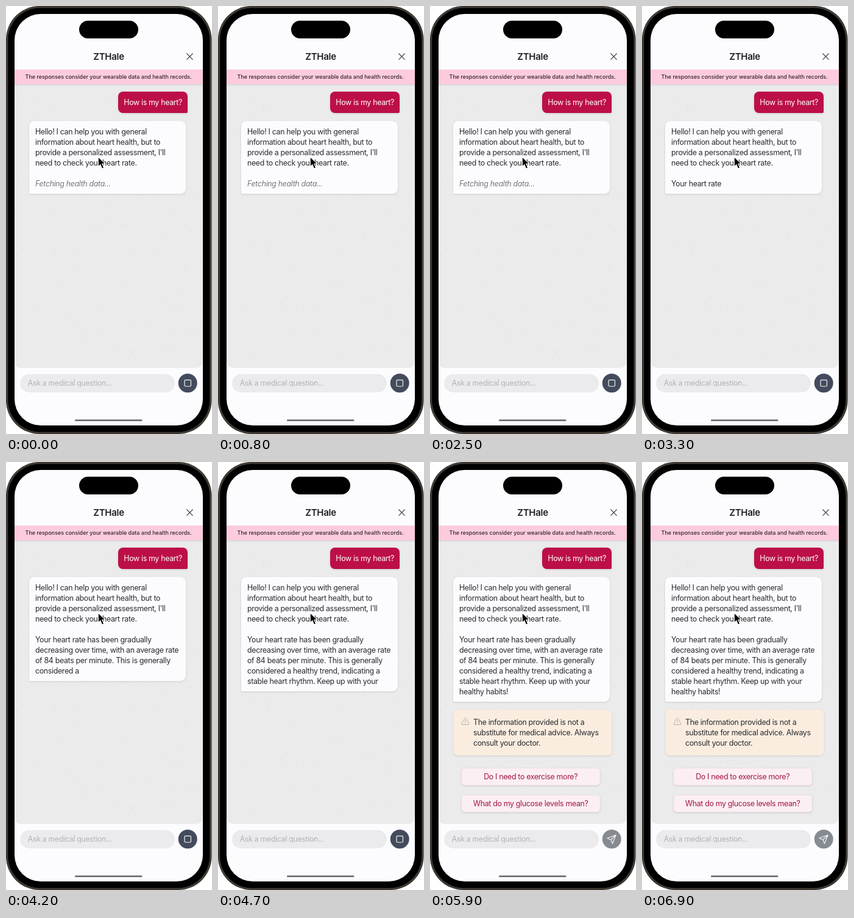
Animation, 338 px wide and 700 px high, one loop 7000 ms. Source, as an HTML page:

```html
<!DOCTYPE html>
<html lang="en">
<head>
<meta charset="utf-8">
<title>Health chat</title>
<style>
  html, body { margin: 0; width: 100%; height: 100%; overflow: hidden; background: #fff; }
  svg { display: block; width: 338px; height: 700px; }
  text { font: 12.4px Inter, "Open Sans", sans-serif; letter-spacing: -.027em; fill: #2b2b30; white-space: pre; }
  .mid { text-anchor: middle; }
  .title { font-size: 15px; font-weight: 600; letter-spacing: -.02em; fill: #1c1c1f; }
  .banner { font-size: 9px; font-weight: 500; letter-spacing: -.002em; fill: #33272e; }
  .own { fill: #fff; }
  .wait { font-style: italic; fill: #77777c; }
  .hint { fill: #b3b3b8; }
  .chip text { fill: #a31546; }
  .chip rect { fill: #fbeff4; stroke: #f4dfe8; stroke-width: .7; }
  .line { fill: none; stroke-linecap: round; stroke-linejoin: round; }
  .lift { filter: drop-shadow(0 1px 1.5px rgba(0, 0, 0, .13)); }
</style>
</head>
<body>
<svg viewBox="0 0 338 700">
  <defs>
    <clipPath id="screen"><rect x="14" y="13" width="309" height="673" rx="43"/></clipPath>
  </defs>

  <rect width="337.5" height="700" rx="55" fill="#342e28"/>
  <rect x="1.5" y="1.5" width="334.5" height="697" rx="54" fill="#5b554d"/>
  <rect x="2.5" y="2.5" width="332.5" height="695" rx="53" fill="#161412"/>
  <rect x="4" y="4" width="329.5" height="692" rx="52" fill="#000"/>

  <g clip-path="url(#screen)">
    <rect x="14" y="13" width="309" height="673" fill="#fcfcfe"/>
    <path d="M14 128H323V582a10 10 0 0 1-10 10H24a10 10 0 0 1-10-10z" fill="#ebebec"/>
    <path id="darkGrain" class="line" stroke="#b9b9bd" stroke-opacity=".5" stroke-width=".8"/>
    <path id="lightGrain" class="line" stroke="#fafafa" stroke-opacity=".75" stroke-width=".9"/>
    <rect class="lift" x="14" y="104" width="309" height="24" fill="#fccbde"/>
  </g>

  <rect x="120" y="24" width="97" height="29" rx="14.5" fill="#000"/>
  <text class="mid title" x="168.5" y="88.3">ZTHale</text>
  <path class="line" d="M296.8 78l9.4 9.4m0-9.4l-9.4 9.4" stroke="#4a4a4e" stroke-width="1.3"/>
  <text class="mid banner" x="168.2" y="119.3">The responses consider your wearable data and health records.</text>

  <path class="lift" d="M192 140H290a8 8 0 0 1 8 8V173a2 2 0 0 1-2 2H192a8 8 0 0 1-8-8V148a8 8 0 0 1 8-8z" fill="#bd0f47"/>
  <text class="own" x="193.3" y="162.3">How is my heart?</text>

  <path id="bubble" class="lift" fill="#fcfcfe"/>
  <g id="reply"></g>
  <text id="wait" class="wait" x="48" y="294.8">Fetching health data...</text>

  <g id="advice">
    <rect class="lift" x="38.5" y="405" width="260" height="75" rx="7" fill="#faeddf"/>
    <g class="line" stroke="#b8b0a8" stroke-width="1">
      <path d="M57 419.2q.9-1.4 1.8 0l5 8.7q.7 1.5-1 1.6H53q-1.700-.1-1-1.600z"/>
      <path d="M57.900 422.500v3.300m0 1.700v.1"/>
    </g>
    <g id="notice"></g>
    <g class="chip">
      <rect class="lift" x="52" y="501" width="227" height="27.500" rx="5"/>
      <text class="mid" x="165.200" y="519">Do I need to exercise more?</text>
      <rect class="lift" x="52" y="545" width="227" height="27.500" rx="5"/>
      <text class="mid" x="165.200" y="563">What do my glucose levels mean?</text>
    </g>
  </g>

  <rect x="23" y="602" width="254" height="30" rx="15" fill="#ebebed"/>
  <text class="hint" x="35.800" y="621.300">Ask a medical question...</text>
  <g id="stop">
    <circle cx="298.200" cy="616.800" r="15.500" fill="#434b5c"/>
    <rect class="line" x="293" y="611.600" width="10.400" height="10.400" rx="1.500" stroke="#f3f3f5" stroke-width="1.200"/>
  </g>
  <g id="send">
    <circle cx="298.200" cy="616.800" r="15.500" fill="#868a91"/>
    <path class="line" d="M305 610l-14.200 5.300 6 2.700 2.700 6zl-8.200 8" stroke="#f3f3f5" stroke-width="1.200"/>
  </g>
  <rect x="113" y="676.300" width="110.500" height="2.700" rx="1.350" fill="#707074"/>

  <path d="M151.300 247V262.500l3.500-3.300 2.900 6.700 2.800-1.200-2.900-6.600h5z" fill="#000" stroke="#fff" stroke-width="1" stroke-linejoin="round"/>
</svg>

<script>
const LOOP = 7000, STEP = 100, LEADING = 16.95;
const REPLY_AT = 3200, DONE_AT = 4800;
const $ = id => document.getElementById(id);

const intro = [
  "Hello! I can help you with general",
  "information about heart health, but to",
  "provide a personalized assessment, I'll",
  "need to check your heart rate."
];
const answer = [
  "Your heart rate has been gradually",
  "decreasing over time, with an average rate",
  "of 84 beats per minute. This is generally",
  "considered a healthy trend, indicating a",
  "stable heart rhythm. Keep up with your",
  "healthy habits!"
].map(line => line.split(" "));
const notice = [
  "The information provided is not a",
  "substitute for medical advice. Always",
  "consult your doctor."
];

function addLine(parent, x, y, content = "") {
  const node = document.createElementNS("http://www.w3.org/2000/svg", "text");
  node.setAttribute("x", x);
  node.setAttribute("y", y);
  node.textContent = content;
  return parent.appendChild(node);
}

intro.forEach((s, i) => addLine($("reply"), 48, 210 + i * LEADING, s));
notice.forEach((s, i) => addLine($("notice"), 71, 430.3 + i * LEADING, s));
const rows = answer.map((_, i) => addLine($("reply"), 48, 210 + (i + 5) * LEADING));

// Paper grain: short seeded flecks
let seed = 11;
const rand = () => (seed = seed * 16807 % 2147483647) / 2147483647;
function grain(count) {
  let d = "";
  for (let i = 0; i < count; i++) {
    const x = 15 + rand() * 307, y = 131 + rand() * 458;
    d += `M${x.toFixed(1)} ${y.toFixed(1)}l${(rand() - .5).toFixed(1)} ${(rand() * .8).toFixed(1)}`;
  }
  return d;
}
$("darkGrain").setAttribute("d", grain(520));
$("lightGrain").setAttribute("d", grain(380));

const show = (id, on) => $(id).style.display = on ? "" : "none";

function bubblePath(bottom) {
  return `M47 188H286a9 9 0 0 1 9 9V${bottom - 9}a9 9 0 0 1-9 9H40a2 2 0 0 1-2-2V197a9 9 0 0 1 9-9z`;
}

function render(t) {
  let left = t < REPLY_AT ? 0 : Math.round(3 + (t - 3300) / 45);
  let used = 1;
  answer.forEach((words, i) => {
    if (left > 0) used = i + 1;
    rows[i].textContent = words.slice(0, Math.max(0, left)).join(" ");
    left -= words.length;
  });
  $("bubble").setAttribute("d", bubblePath(307.3 + (used - 1) * LEADING));
  const done = t >= DONE_AT;
  show("wait", t < REPLY_AT);
  show("advice", done);
  show("send", done);
  show("stop", !done);
}

let last = -1;
function tick() {
  const t = Math.floor(performance.now() % LOOP / STEP) * STEP;
  if (t !== last) render(last = t);
  requestAnimationFrame(tick);
}
tick();
</script>
</body>
</html>
```
